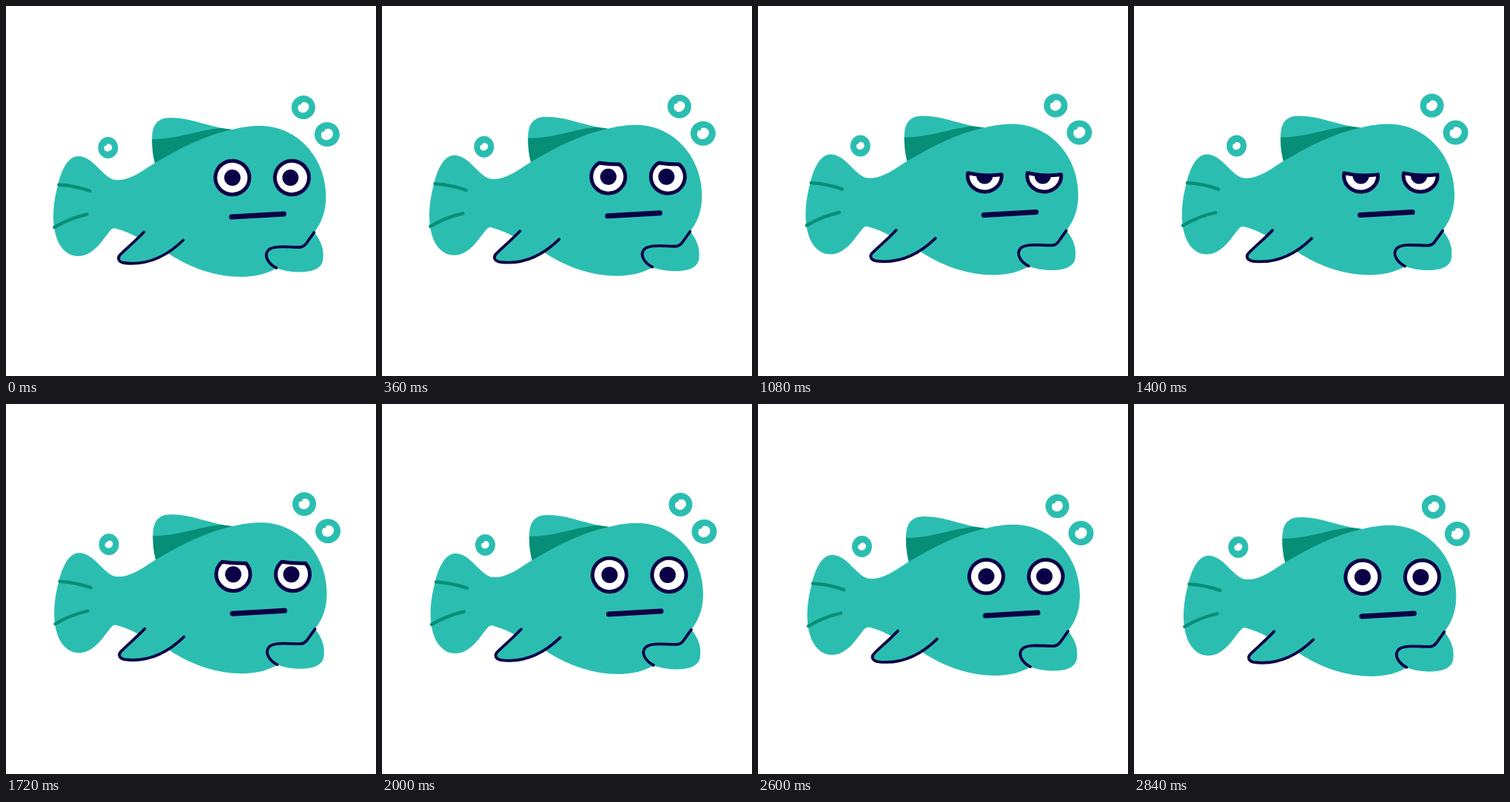
Write an HTML page with a canvas that moves like this. It is 500 by 500 pixels and loops after 2880 ms.

```html
<!DOCTYPE html>
<html lang="en">
<head>
<meta charset="utf-8">
<title>Tired fish</title>
<style>
  html, body { margin: 0; width: 100%; height: 100%; overflow: hidden; background: #fff; }
  canvas { display: block; width: 100vmin; height: 100vmin; }
</style>
</head>
<body>
<canvas id="stage" width="500" height="500"></canvas>
<script>
const canvas = document.getElementById('stage');
const ctx = canvas.getContext('2d');
const TEAL = '#2bbeb0', GREEN = '#078e76', NAVY = '#0b0046', WHITE = '#fff';
const LOOP = 2880, STEP = 40;

const body = new Path2D(`M147 235 C130 232 118 203 97 203 C83 203 74 223 69.5 243
  C64 263 62 285 65 301 C68 322 80 338 97 338 C119 338 131 314 141 303
  Q144 299 149 301 C160 304 169 308 178 313 L220 335
  C250 355 285 366 317 366 C338 366 354 361 366 354 L404 325 L416 306
  C428 290 432 275 432 257 C432 205 393 162 343 162 C330 162 316 164 305 167
  C268 175 235 192 201 212 C187 220 168 237 147 235 Z`);
const dorsal = new Path2D(`M305 167 C275 164 250 151 222 151 C201 151 196.500 164 197 184
  C197 195 199 205 201 213 L240 202 Z`);
const dorsalBand = new Path2D(`M197 180 C233 180 260 167 290 165 L305 167
  C270 175 235 192 201 213 C198 202 197 191 197 180 Z`);
const sideFin = new Path2D(`M186 305.500 C174 318 163 327 154.500 335.500 C149.500 340 151 345 158 347
  C187 351 215 340 239 316.500`);
const chinFin = new Path2D(`M416 306 C424 315 430 328 428 342 C427 355 413 359.500 397 359.500
  C385 359.500 375 358 365 354 C354 348 347 337 353 330 C360 321 386 327 401 326 Z`);
const chinLine = new Path2D(`M416 306 L406 320 Q402 326 396 326
  C380 326 361 323 354 330 C347 338 355 349 365 354`);
const tailTop = new Path2D('M71 241.500 Q94 243 113 250');
const tailLow = new Path2D('M65 299 Q85 287 109 281.500');
const mouth = new Path2D('M304.500 285 L375 281');

const eyes = [
  { x: 305.5, y: 232, pupil: 305.5, tilt: 1 },
  { x: 386, y: 232, pupil: 384, tilt: 1 }
];
const bubbles = [
  { x: 401.5, y: 137, rx: 16, ry: 16, hole: 7.8 },
  { x: 433.5, y: 173.5, rx: 17, ry: 16.5, hole: 8.4 },
  { x: 137.5, y: 191.5, rx: 13.5, ry: 14.5, hole: 5.6 }
];

function fill(path, color) {
  ctx.fillStyle = color;
  ctx.fill(path);
}

function stroke(path, color, width) {
  ctx.strokeStyle = color;
  ctx.lineWidth = width;
  ctx.stroke(path);
}

function oval(x, y, rx, ry, color, turn = 0) {
  ctx.fillStyle = color;
  ctx.beginPath();
  ctx.ellipse(x, y, rx, ry, turn, 0, Math.PI * 2);
  ctx.fill();
}

function drawBubble({ x, y, rx, ry, hole }) {
  oval(x, y, rx, ry, TEAL);
  oval(x, y, hole, hole * 0.88, WHITE, -0.6);
  oval(x - hole * 0.65, y - hole * 0.8, hole * 0.35, hole * 0.35, TEAL);
}

// Eye outline, its top cut off by a sagging lid
function eyeShape({ x, y, tilt }, closed) {
  const rx = 23, ry = 22.7 - 1.2 * closed;
  const cut = 23 - 20.3 * closed;
  const angle = height => Math.asin(Math.min(1, Math.max(0, height) / ry));
  const right = -angle(cut - tilt), left = Math.PI + angle(cut + tilt);
  const path = new Path2D();
  path.ellipse(x, y, rx, ry, 0, right, left);
  path.quadraticCurveTo(x, y - cut + 4 * closed, x + rx * Math.cos(right), y + ry * Math.sin(right));
  path.closePath();
  return path;
}

function drawEye(eye, closed) {
  const shape = eyeShape(eye, closed);
  fill(shape, WHITE);
  ctx.save();
  ctx.clip(shape);
  oval(eye.pupil, eye.y, 11, 11, NAVY);
  ctx.restore();
  stroke(shape, NAVY, 5);
}

function ease(t, from, to) {
  const p = Math.min(1, Math.max(0, (t - from) / (to - from)));
  return p * p * (3 - 2 * p);
}

// Slow bob: slices of two long sine waves, restarting hard with the loop
function drift(t) {
  const swing = (time, low, half) => 1 - Math.cos((time - low) * Math.PI / half);
  return {
    x: 0.4 + 2.46 * (swing(t, 250, 4500) - swing(0, 250, 4500)),
    y: 2.92 * (swing(t, 1150, 2500) - swing(0, 1150, 2500))
  };
}

function draw(t) {
  const size = Math.round(Math.min(innerWidth, innerHeight) * (devicePixelRatio || 1)) || 500;
  if (canvas.width !== size) canvas.width = canvas.height = size;
  ctx.setTransform(size / 500, 0, 0, size / 500, 0, 0);
  ctx.fillStyle = WHITE;
  ctx.fillRect(0, 0, 500, 500);
  ctx.lineCap = ctx.lineJoin = 'round';

  const { x, y } = drift(t);
  ctx.translate(x, y);

  bubbles.forEach(drawBubble);
  fill(dorsal, TEAL);
  fill(dorsalBand, GREEN);
  fill(body, TEAL);
  stroke(tailTop, GREEN, 4.5);
  stroke(tailLow, GREEN, 4.5);
  fill(sideFin, TEAL);
  stroke(sideFin, NAVY, 3.8);
  fill(chinFin, TEAL);
  stroke(chinLine, NAVY, 3.8);
  stroke(mouth, NAVY, 7);

  const closed = ease(t, 280, 520) - ease(t, 1600, 1800);
  eyes.forEach(eye => drawEye(eye, closed));
}

const start = performance.now();
function tick() {
  const t = (performance.now() - start) % LOOP;
  draw(Math.floor(t / STEP) * STEP);
  requestAnimationFrame(tick);
}
tick();
</script>
</body>
</html>
```
